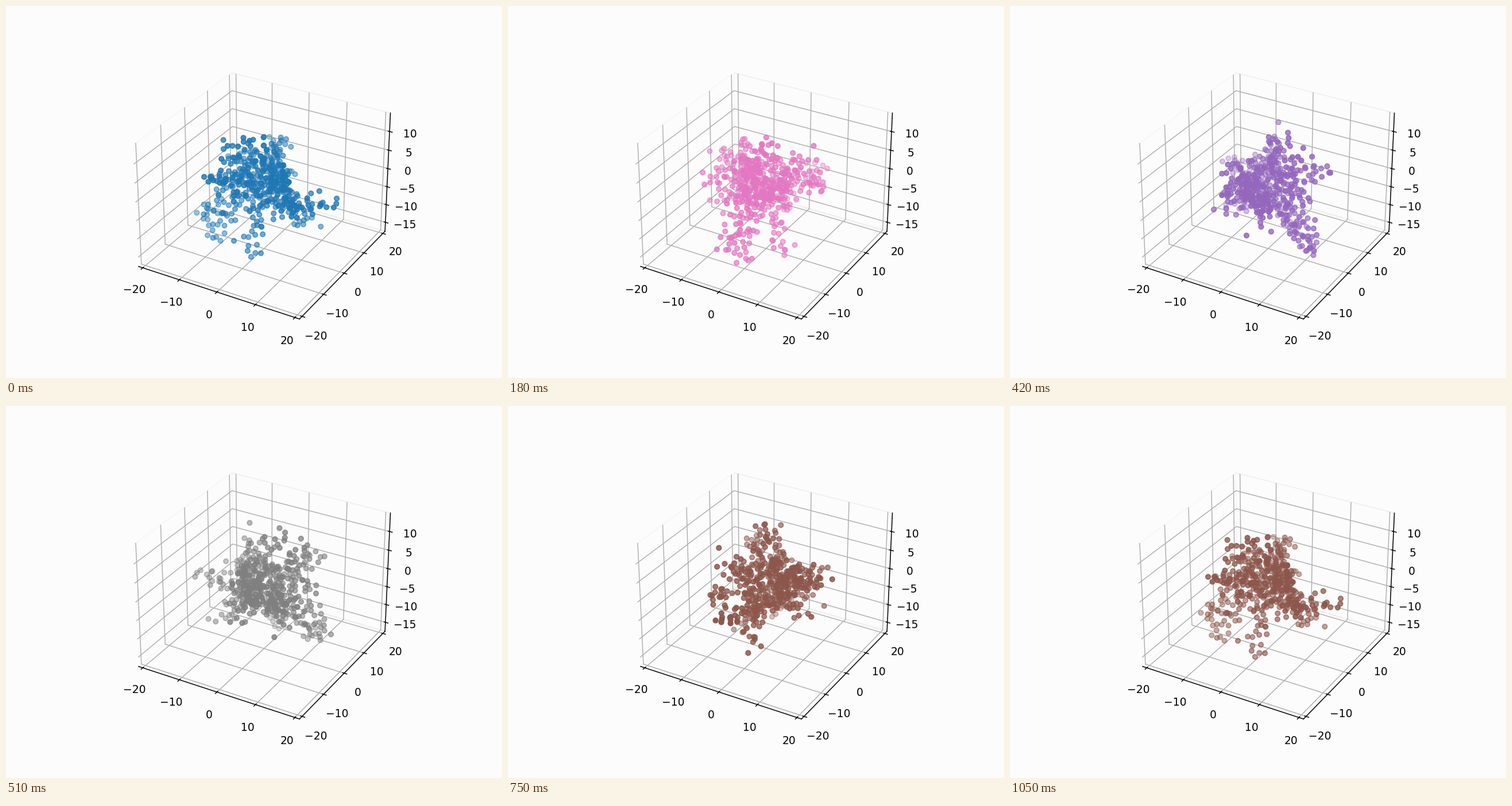
These frames come from a looping animation (864 px wide and 648 px high, 1.08 s). A matplotlib script:

```python
import numpy as np
import matplotlib.pyplot as plt
from matplotlib.animation import FuncAnimation

FRAMES = 36
COUNT = 490
BACK = "#fcfcfc"
rng = np.random.default_rng(11)

plt.rcParams.update({"figure.facecolor": BACK, "axes.facecolor": BACK})
fig = plt.figure(figsize=(6.4, 4.8), dpi=135)
ax = fig.add_subplot(projection="3d")

ax.set_xlim(-21.15, 21.15)
ax.set_ylim(-21.15, 21.15)
ax.set_zlim(-17.56, 14.9)
ax.set_xticks(range(-20, 21, 10))
ax.set_yticks(range(-20, 21, 10))
ax.set_zticks(range(-15, 11, 5))
for axis in (ax.xaxis, ax.yaxis, ax.zaxis):
    axis.pane.set_fill(False)

# Limb ends of the molecule: right, away from the viewer, up.
TIPS = np.array([
    (-16, 3, -11), (-11.5, 0, -13.5), (-3.4, -6.4, -14.5), (10.5, -1, -10.5),
    (14.5, -6, -3), (8, -11.8, 0), (4.2, -8.7, 7.4), (-2.3, -1.6, 12.9),
    (-8.7, 0, 9.2), (-12.2, -5.9, 5.2), (-12.5, 1.8, 0.6), (-5.5, 11.2, 1.8),
    (-5.5, 10, -4.5), (4.5, 9.5, -3.5), (2.4, 12, 3.8), (3.7, 8, 6.6)])


def limb(tip, n=36):
    """Atoms scattered along a line from the middle to the tip."""
    t = rng.uniform(0.1, 1, (n, 1)) ** 0.6
    return tip * t + rng.normal(0, 1.3, (n, 3))


def ball(radius, n):
    v = rng.normal(size=(n, 3))
    v /= np.linalg.norm(v, axis=1, keepdims=True)
    return v * radius * rng.random((n, 1)) ** (1 / 3)


def spaced(pts, gap, count):
    """Drop atoms that sit too close to an earlier one."""
    kept = [pts[0]]
    for p in pts[1:]:
        if len(kept) < count and np.linalg.norm(np.array(kept) - p, axis=1).min() > gap:
            kept.append(p)
    return np.array(kept)


def turn(pts, angle):
    x, y, z = pts.T
    c, s = np.cos(angle), np.sin(angle)
    return x * c - y * s, x * s + y * c, z


cloud = np.vstack([ball(7, 180)] + [limb(tip) for tip in TIPS])
atoms = spaced(rng.permutation(cloud), 1.2, COUNT)
start = np.radians(ax.azim + 90)


def update(i):
    for old in list(ax.collections):
        old.remove()
    angle = start + 2 * np.pi * i / (FRAMES - 1)
    return ax.scatter(*turn(atoms, angle), color=f"C{i % 10}"),


anim = FuncAnimation(fig, update, frames=FRAMES, init_func=lambda: update(0),
                     interval=30, repeat=True, repeat_delay=0, blit=False)
plt.show()
```
